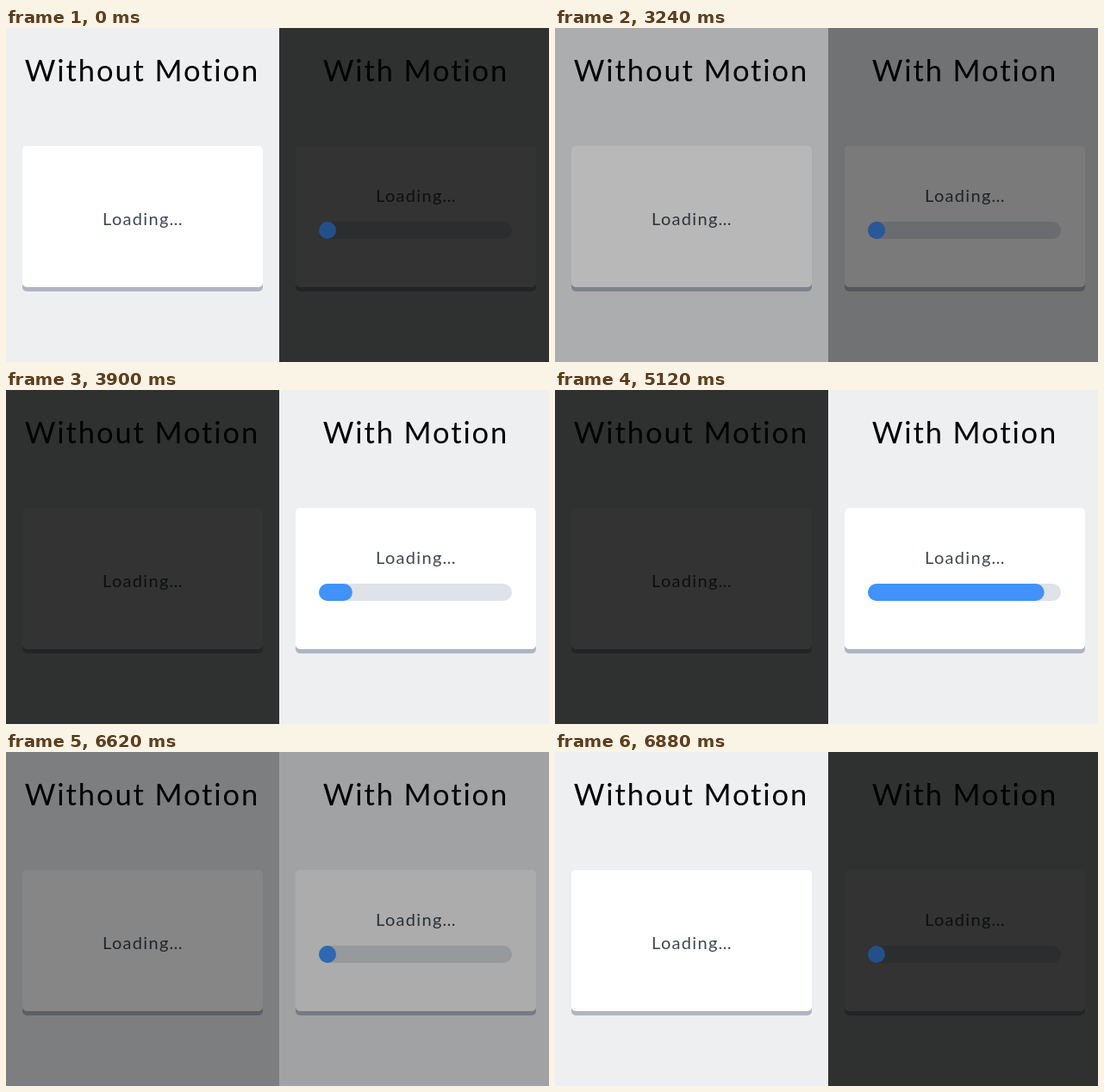
An HTML page that plays this animation: 630 by 388 pixels, repeating every 7100 ms.

```html
<!DOCTYPE html>
<html lang="en">
<head>
<meta charset="utf-8">
<title>Loading with and without motion</title>
<style>
  html, body { margin: 0; width: 100%; height: 100%; overflow: hidden; background: #edeff1; }
  svg { display: block; width: 630px; height: 388px; }
  text { font-family: Lato, "Open Sans", sans-serif; text-anchor: middle; }
  .title { font-size: 34.5px; letter-spacing: 1.9px; fill: #000; }
  .label { font-size: 20px; letter-spacing: 1.3px; fill: #3d4752; }
</style>
</head>
<body>
<svg viewBox="0 0 630 388">
  <defs>
    <g id="card">
      <rect y="142" width="279" height="164" rx="5" fill="#afb5c1"/>
      <rect y="137" width="279" height="164" rx="5" fill="#fff"/>
    </g>
  </defs>
  <rect width="630" height="388" fill="#edeff1"/>

  <text class="title" x="158" y="62">Without Motion</text>
  <use href="#card" x="19"/>
  <text class="label" x="159" y="229">Loading…</text>
  <rect id="leftShade" width="317" height="388"/>

  <text class="title" x="475.5" y="62">With Motion</text>
  <use href="#card" x="336"/>
  <text class="label" x="476" y="202">Loading…</text>
  <rect x="363" y="225" width="224" height="20" rx="10" fill="#dee2e9"/>
  <rect id="rightShade" x="317" width="313" height="388"/>
  <rect id="fill" x="363" y="225" height="20" rx="10"/>
</svg>
<script>
const LOOP = 7100, SHADE = 0.8, FADE = 364;
const $ = id => document.getElementById(id);
const leftShade = $('leftShade'), rightShade = $('rightShade'), fill = $('fill');

// CSS-style cubic bezier easing, solved by bisection
function bezier(x1, y1, x2, y2) {
  const at = (a, b, s) => 3 * a * s * (1 - s) ** 2 + 3 * b * s * s * (1 - s) + s ** 3;
  return x => {
    if (x <= 0) return 0;
    if (x >= 1) return 1;
    let lo = 0, hi = 1;
    for (let i = 0; i < 30; i++) {
      const mid = (lo + hi) / 2;
      if (at(x1, x2, mid) < x) lo = mid; else hi = mid;
    }
    return at(y1, y2, lo);
  };
}
const ease = bezier(0.25, 0.1, 0.25, 1);
const grow = bezier(0.615, 0, 0.256, 1);
const span = (t, start, length) => (t - start) / length;

function draw(t) {
  const focus = ease(span(t, 3160, FADE)) - ease(span(t, 6530, FADE));
  leftShade.setAttribute('opacity', SHADE * focus);
  rightShade.setAttribute('opacity', SHADE * (1 - focus));

  const progress = grow(span(t, 3160, 2880)) - ease(span(t, 6130, 400));
  fill.setAttribute('width', 20 + 204 * progress);
  const light = 0.55 + 0.45 * focus ** 2;
  fill.setAttribute('fill', `rgb(${[65, 146, 251].map(c => Math.round(c * light))})`);
}

const begin = performance.now();
function tick() {
  draw((performance.now() - begin) % LOOP);
  requestAnimationFrame(tick);
}
tick();
</script>
</body>
</html>
```
